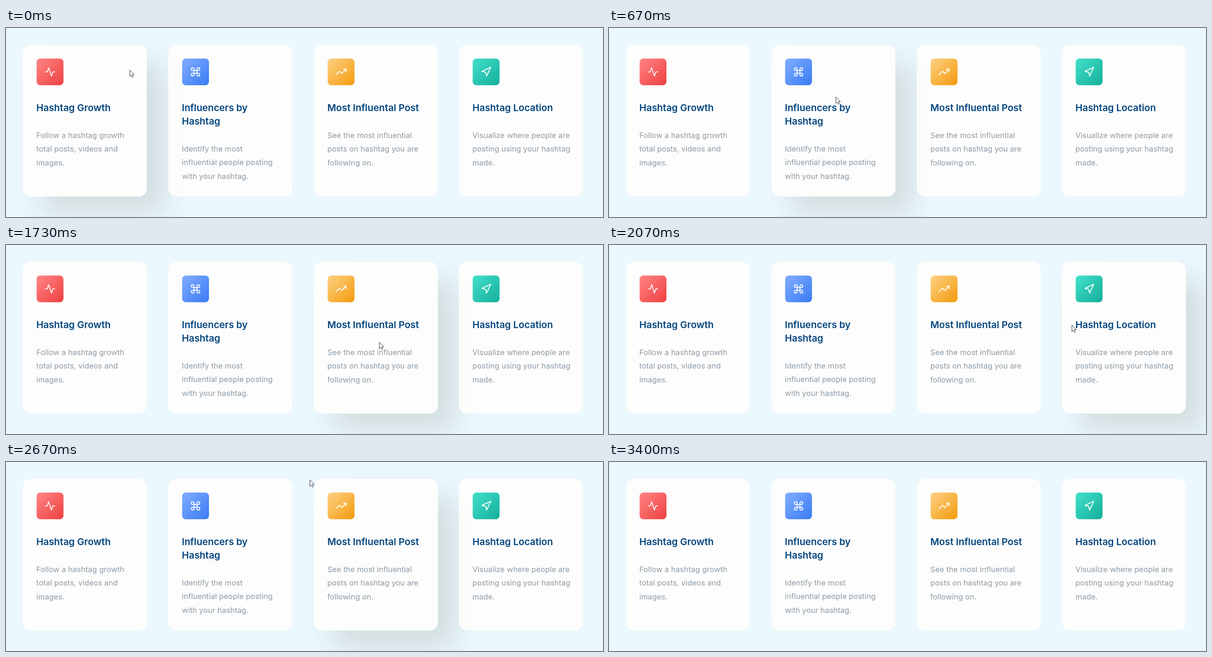
Write an HTML page that moves like this. It is 1280 px wide and 407 px high and loops after 3.43 s.

```html
<!DOCTYPE html>
<html lang="en">
<head>
<meta charset="utf-8">
<title>Hashtag features</title>
<style>
  html, body { margin: 0; width: 100%; height: 100%; overflow: hidden; background: #ebf8fe; }
  #stage { position: relative; width: 1280px; height: 407px; overflow: hidden; }
  .card {
    position: absolute; top: 36px; width: 266px; height: 326.5px;
    border-radius: 18px; background: rgba(255, 254, 252, .88);
  }
  .card.hover { box-shadow: 40px 40px 60px rgba(40, 42, 10, .12); }
  .card svg { position: absolute; inset: 0; width: 100%; height: 100%; overflow: visible; }
  text { font-family: "DM Sans", Inter, sans-serif; }
  .title { font-size: 20.4px; font-weight: 600; fill: #04457f; }
  .body { font-size: 16.4px; fill: #8f9ba7; }
  .icon {
    fill: none; stroke: #fff; stroke-opacity: .92; stroke-width: 2;
    stroke-linecap: round; stroke-linejoin: round;
  }
  #cursor { position: absolute; left: 0; top: 0; width: 12px; height: 18px; overflow: visible; }
</style>
</head>
<body>
<div id="stage"></div>
<script>
const LOOP = 3430, LAG = 33;
const CARD = { x: 36, y: 36, w: 266, h: 326.5, pitch: 311.8 };

const cards = [
  {
    colors: ['#ff8585', '#ef4040'],
    icon: 'M22 12h-4l-3 9L9 3l-3 9H2',
    title: ['Hashtag Growth'],
    body: ['Follow a hashtag growth', 'total posts, videos and', 'images.'],
  },
  {
    colors: ['#82adff', '#397bf4'],
    icon: 'M18 3a3 3 0 0 0-3 3v12a3 3 0 1 0 3-3H6a3 3 0 1 0 3 3V6a3 3 0 1 0-3 3h12a3 3 0 0 0 0-6z',
    title: ['Influencers by', 'Hashtag'],
    body: ['Identify the most', 'influential people posting', 'with your hashtag.'],
  },
  {
    colors: ['#fcd285', '#f49a0c'],
    icon: 'M23 6l-9.5 9.5-5-5L1 18M17 6h6v6',
    title: ['Most Influental Post'],
    body: ['See the most influential', 'posts on hashtag you are', 'following on.'],
  },
  {
    colors: ['#42e0ca', '#15ae9b'],
    icon: 'M3 11L22 2l-9 19-2-8z',
    title: ['Hashtag Location'],
    body: ['Visualize where people are', 'posting using your hashtag', 'made.'],
  },
];

// Pointer path: time, x, y
const path = [
  [0, 265, 90], [670, 486, 148], [1100, 676, 157], [1730, 800, 209],
  [2070, 992, 172], [2250, 1050, 152], [2670, 652, 38], [2830, 560, -25],
];

const stage = document.getElementById('stage');

const lines = (rows, cls, y, step) => rows
  .map((row, i) => `<text class="${cls}" x="29" y="${y + i * step}">${row}</text>`)
  .join('');

const cardEls = cards.map((card, i) => {
  const el = document.createElement('div');
  el.className = 'card';
  el.style.left = CARD.x + i * CARD.pitch + 'px';
  const bodyY = 172 + card.title.length * 28.8;
  el.innerHTML = `<svg>
    <linearGradient id="g${i}" x1="0" y1="0" x2="1" y2="1">
      <stop stop-color="${card.colors[0]}"/><stop offset="1" stop-color="${card.colors[1]}"/>
    </linearGradient>
    <rect x="29.6" y="29.7" width="57.6" height="57.6" rx="8" fill="url(#g${i})"/>
    <path class="icon" d="${card.icon}" transform="translate(46.4 46.5)"/>
    ${lines(card.title, 'title', 143, 28.8)}
    ${lines(card.body, 'body', bodyY, 29.5)}
  </svg>`;
  stage.append(el);
  return el;
});

stage.insertAdjacentHTML('beforeend', `<svg id="cursor">
  <path d="M.5 .5V14.2L3.6 11.3 5.7 16.1 7.9 15.1 5.8 10.5H10z" fill="#fff" stroke="#33363c" stroke-linejoin="round"/>
</svg>`);
const cursor = document.getElementById('cursor');

// Slope of one coordinate at a path point; the ends keep their neighbour's slope
function slope(i, axis) {
  const a = path[Math.max(i - 1, 0)], b = path[Math.min(i + 1, path.length - 1)];
  return (b[axis] - a[axis]) / (b[0] - a[0]);
}

function pointerAt(t) {
  const last = path.length - 1;
  if (t <= 0) return path[0].slice(1);
  if (t >= path[last][0]) return path[last].slice(1);
  const i = path.findIndex(p => p[0] > t) - 1;
  const a = path[i], b = path[i + 1], d = b[0] - a[0], u = (t - a[0]) / d;
  return [1, 2].map(k =>
    (1 + 2 * u) * (1 - u) ** 2 * a[k] + u * (1 - u) ** 2 * d * slope(i, k) +
    u * u * (3 - 2 * u) * b[k] + u * u * (u - 1) * d * slope(i + 1, k));
}

function draw() {
  const t = performance.now() % LOOP;
  const [x, y] = pointerAt(t);
  cursor.style.transform = `translate(${Math.round(x)}px, ${Math.round(y)}px)`;

  const [hx, hy] = pointerAt(t - LAG);
  const inRow = hy >= CARD.y && hy <= CARD.y + CARD.h;
  cardEls.forEach((el, i) => {
    const dx = hx - CARD.x - i * CARD.pitch;
    el.classList.toggle('hover', inRow && dx >= 0 && dx <= CARD.w);
  });
  requestAnimationFrame(draw);
}
draw();
</script>
</body>
</html>
```
